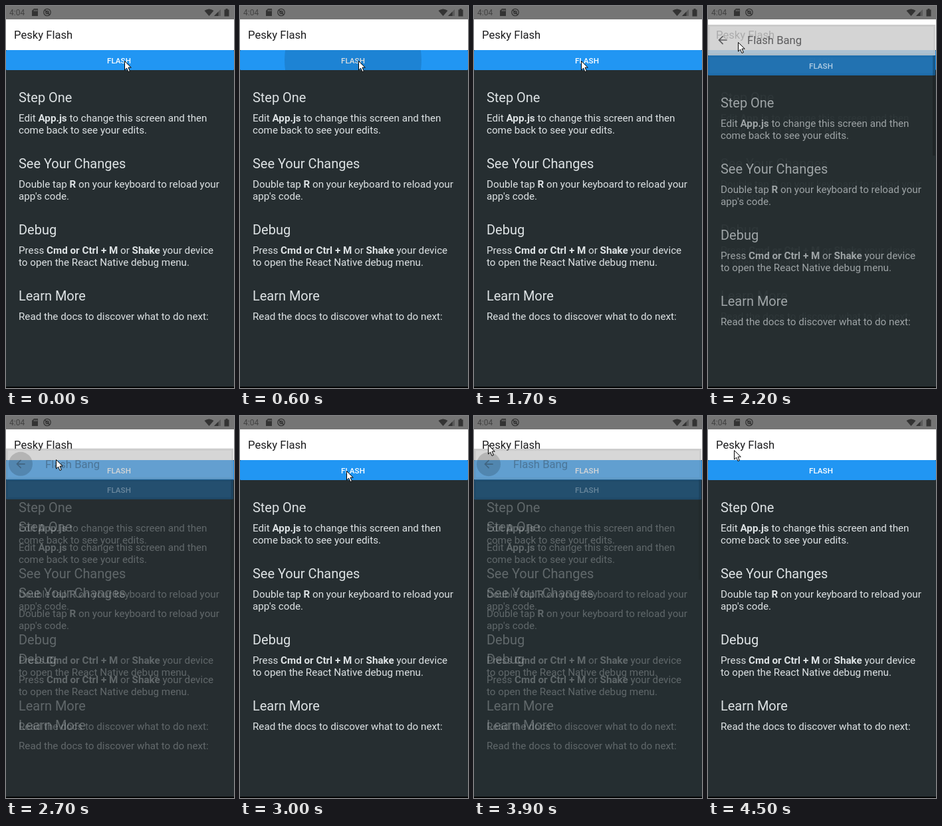
An HTML page that plays this animation: 343x572 px, repeating every 4.6 s.

```html
<!DOCTYPE html>
<html lang="en">
<head>
<meta charset="utf-8">
<title>Pesky Flash</title>
<style>
  html, body { margin: 0; width: 100%; height: 100%; overflow: hidden; background: #000; }
  svg { display: block; width: 343px; height: 572px; font-family: Roboto, sans-serif; }
  .title { font-size: 16.64px; fill: #1c1c1e; }
  .head { font-size: 19.97px; fill: #dee3e5; }
  .body { font-size: 15.2px; fill: #dee3e5; }
  .label { font-size: 11.65px; font-weight: 500; fill: #fff; text-anchor: middle; }
  .bold { font-weight: 700; }
  .ink { opacity: var(--a, 1); }
  .shade { opacity: var(--shade, 0); }
  .back { opacity: var(--back, 1); }
</style>
</head>
<body>
<svg viewBox="0 0 343 572">
  <defs>
    <clipPath id="view"><rect y="20" width="343" height="550"/></clipPath>
    <clipPath id="button"><rect y="66" width="342" height="30" rx="1.5"/></clipPath>
  </defs>
  <g clip-path="url(#view)">
    <g id="home"></g>
    <g clip-path="url(#button)"><circle id="press" cx="170" cy="81" fill-opacity=".13"/></g>
    <g id="card"></g>
  </g>
  <g id="status" fill="#333">
    <rect width="343" height="20" fill="#757575"/>
    <text x="5" y="14" font-size="12" fill="#424242">4:04</text>
    <path d="M42 4h6v11h-9V7z"/>
    <path d="M42.5 5.5v2.5M44.5 5.5v2.5M46.5 5.5v2.5" stroke="#757575"/>
    <g fill="none" stroke="#333" stroke-width="1.3">
      <circle cx="62" cy="9.5" r="5.2"/>
      <circle cx="62" cy="9.5" r="2.2"/>
      <path d="M58.5 6l7 7"/>
    </g>
    <path d="M298.5 7q7-5 14 0l-7 8z"/>
    <path d="M313 15l10-10v10z" fill-opacity=".4"/>
    <path d="M313 15l6.5-6.5v6.5z"/>
    <path d="M328.5 5.5h2v-1.5h3v1.5h2v10h-7z"/>
  </g>
  <path id="cursor" d="M.5.5v13.5l3.1-2.9 2.4 5.4 2.4-1-2.4-5.4h4.3z" fill="#fff" stroke="#000"/>
</svg>
<script>
const $ = id => document.getElementById(id);
const LOOP = 4600, STEP = 100, TRAVEL = 46, OPEN_TIME = 350, CLOSE_TIME = 150;

const sections = [
  ['Step One', 'Edit *App.js* to change this screen and then', 'come back to see your edits.'],
  ['See Your Changes', 'Double tap *R* on your keyboard to reload your', "app's code."],
  ['Debug', 'Press *Cmd or Ctrl + M* or *Shake* your device', 'to open the React Native debug menu.'],
  ['Learn More', 'Read the docs to discover what to do next:']
];

// Each visit: button pressed, card starts to rise, arrow pressed, card starts to sink.
const visits = [
  { press: 600, open: 697, tap: 1400, close: 1450 },
  { press: 2000, open: 2097, tap: 2700, close: 2606 },
  { press: 3100, open: 3190, tap: 3800, close: 3805 }
];

// [time, x, y], straight moves in between
const path = [
  [0, 178, 82], [700, 178, 82], [1200, 20, 42], [1500, 20, 42], [1700, 161, 82],
  [2100, 159, 82], [2200, 45, 54], [2400, 21, 43], [2600, 21, 43], [2700, 75, 65],
  [2900, 160, 82], [3200, 160, 82], [3400, 28, 48], [3500, 21, 43], [3900, 21, 43],
  [4000, 17, 34], [4300, 17, 34], [4400, 312, 556], [4500, 39, 51]
];

const text = (kind, x, y, s) => `<text class="${kind} ink" x="${x}" y="${y}">${
  s.replace(/\*(.+?)\*/g, '<tspan class="bold">$1</tspan>')}</text>`;

function screen(title, x, width, extra = '') {
  const copy = sections.map(([head, ...lines], i) => {
    const y = 144 + 99 * i;
    return text('head', 19, y, head) +
      lines.map((line, j) => text('body', 19, y + 29 + 18 * j, line)).join('');
  }).join('');
  return `<rect class="back" y="66" width="${width}" height="506" fill="#262e31"/>
    <g class="shade">
      <rect y="20" width="342" height="46" fill-opacity=".82"/>
      <rect x="1.5" y="21.5" width="339" height="43" fill="none" stroke="#000" stroke-width="3"/>
      <rect x="1.5" y="67.5" width="339" height="27" fill="none" stroke="#000" stroke-opacity=".5" stroke-width="3"/>
    </g>
    <rect class="ink" y="20" width="${width}" height="46" fill="#fff"/>
    <rect class="ink" y="66" width="${width}" height="30" rx="1.5" fill="#2196f3"/>
    ${text('title', x, 49, title)}${text('label', 170, 86, 'FLASH')}${copy}${extra}`;
}

$('home').innerHTML = screen('Pesky Flash', 12, 343);
$('card').innerHTML = screen('Flash Bang', 59, 342, `
  <circle id="tap" cx="22" cy="43" r="18" fill-opacity=".16"/>
  <path class="ink" fill="#1c1c1e" transform="translate(12 33) scale(.832)"
    d="M20 11H7.83l5.59-5.59L12 4l-8 8 8 8 1.41-1.41L7.83 13H20z"/>
  <rect class="ink" x="338" y="66" width="4" height="150" fill-opacity=".3"/>`);

const clamp = v => Math.min(1, Math.max(0, v));
const mix = (a, b, p) => a + (b - a) * p;

// 1 when the card covers the screen, 0 when it is gone
function progress(t, { open, close }) {
  const rise = 1 - (1 - clamp((t - open) / OPEN_TIME)) ** 5;
  return rise * (1 - clamp((t - close) / CLOSE_TIME));
}

// Opacity follows the card's progress in three straight pieces.
const fade = p => p < .5 ? .86 * p : p < .9 ? .43 + .675 * (p - .5) : .7 + 3 * (p - .9);

function pointer(t) {
  const i = path.findLastIndex(k => k[0] <= t);
  const [t0, x0, y0] = path[i], [t1, x1, y1] = path[i + 1] || [LOOP, x0, y0];
  const p = (t - t0) / (t1 - t0);
  return `translate(${Math.round(mix(x0, x1, p))} ${Math.round(mix(y0, y1, p))})`;
}

function draw(now) {
  const t = Math.floor(now % LOOP / STEP) * STEP;
  const visit = visits.findLast(v => v.press <= t) || visits[0];
  const p = progress(t, visit), a = fade(p), held = t - visit.press;

  const card = $('card');
  card.style.display = p > 0 ? '' : 'none';
  card.setAttribute('transform', `translate(0 ${TRAVEL * (1 - p)})`);
  card.style.setProperty('--a', a);
  card.style.setProperty('--shade', .9 * a);
  card.style.setProperty('--back', 1 - (1 - a) ** 3);

  $('press').setAttribute('r', held >= 0 && held < 2 * STEP ? 103 + .7 * held : 0);
  $('tap').style.display = t >= visit.tap ? '' : 'none';
  $('cursor').setAttribute('transform', pointer(t));
}

const start = performance.now();
function tick() {
  draw(performance.now() - start);
  requestAnimationFrame(tick);
}
tick();
</script>
</body>
</html>
```
